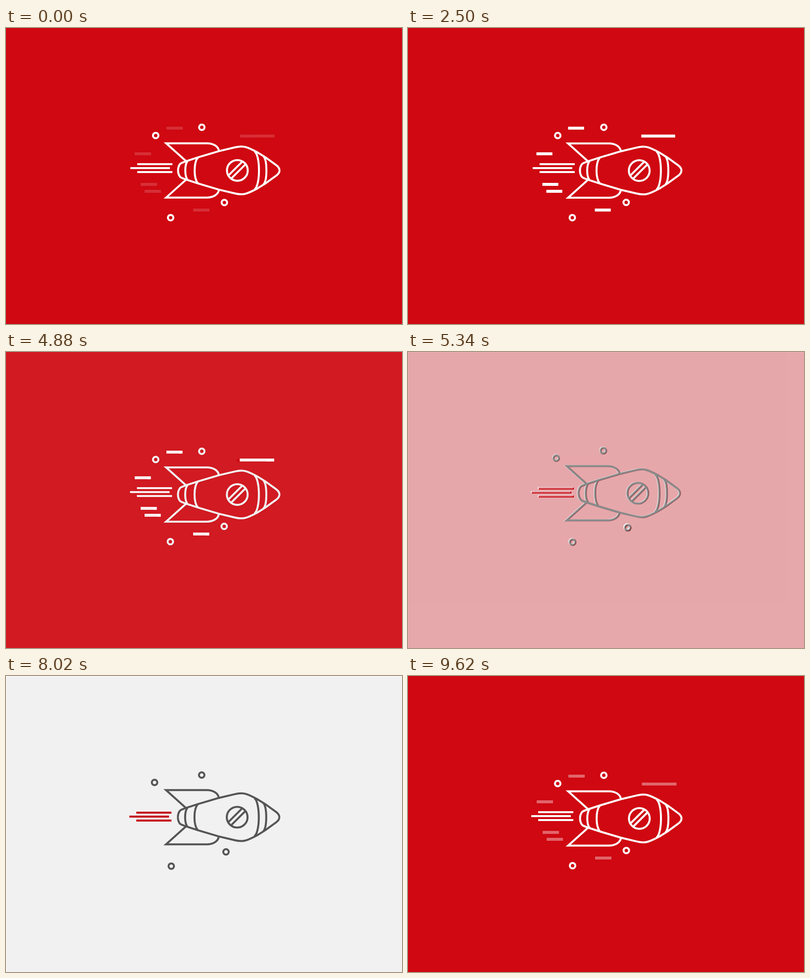
An HTML page for the animation above (9640 ms loop, 800 px wide and 600 px high).

```html
<!DOCTYPE html>
<html lang="en">
<head>
<meta charset="utf-8">
<title>Rocket</title>
<style>
  html, body { margin: 0; width: 100%; height: 100%; overflow: hidden; background: #fff; }
  svg { display: block; width: 100vw; height: 100vh; }
</style>
</head>
<body>
<svg id="stage" viewBox="0 0 800 600"></svg>
<script>
const LOOP = 9640, CYCLE = 1200, FLICKER = 120, FADE = 760;
const stage = document.getElementById('stage');

function add(parent, tag, attrs = {}) {
  const node = document.createElementNS('http://www.w3.org/2000/svg', tag);
  for (const key in attrs) node.setAttribute(key, attrs[key]);
  parent.appendChild(node);
  return node;
}

const clamp = v => Math.max(0, Math.min(1, v));
const swing = (time, peak, period) => Math.cos(2 * Math.PI * (time - peak) / period);
// A swing that lingers at both ends.
const drift = (time, peak) => Math.tanh(1.5 * swing(time, peak, CYCLE)) / Math.tanh(1.5);

const DOTS = [
  { x: 300.5, y: 216.1, dx: 2, dy: 1.9, peak: 100 },
  { x: 394.7, y: 200.2, dx: .9, dy: 1.1, peak: 50 },
  { x: 442.1, y: 354.5, dx: 1.4, dy: 1.1, peak: 810 },
  { x: 332.1, y: 384.4, dx: .8, dy: 0, peak: 980 }
];

// Each streak: left edge, middle height, full length.
const FIRST_STREAKS = [[324, 203, 33], [472.5, 219, 70], [260, 255, 33], [272, 317, 33], [280, 331, 33], [378, 369, 33]];
const LAST_STREAKS = [[345, 219, 70], [256, 255, 33], [264, 331, 33], [273.5, 361, 33], [328.5, 385, 70]];

function drawRocket(parent) {
  const half = [
    'M347.5 288.5C347.5 283 349.5 278 352 275Q353.5 273.5 365 269.5L388 262L430 249.5L462 241.9' +
    'Q476 238.5 485 241.5Q493 244 508 252L524 262L546 278Q552.5 283 552.5 288.5',
    'M364 270L323.5 233.5H406C419 233.5 429 240 430 249'
  ];
  for (const flip of ['', 'matrix(1 0 0 -1 0 577)']) {
    half.forEach(d => add(parent, 'path', { d, transform: flip }));
  }
  add(parent, 'path', {
    d: 'M367 269C360.5 277 360.5 300 367 308M388 262C378.7 272 378.7 305 388 315' +
       'M502 250C514 258 514 319 502 327M520 260C528 268 528 309 520 317' +
       'M449 299L477.5 270.5M455 305L484 276'
  });
  add(parent, 'circle', { cx: 467.3, cy: 288.5, r: 21 });
}

function makeScene(background, line, accent, offset) {
  const root = add(stage, 'g', { transform: `translate(${offset} ${offset})` });
  add(root, 'rect', { width: 800, height: 600, fill: background });
  const strokes = add(root, 'g', { fill: 'none', stroke: line, 'stroke-width': 4, 'stroke-miterlimit': 10 });
  const rocket = add(strokes, 'g');
  drawRocket(rocket);
  const dots = DOTS.map(() => add(strokes, 'circle', { r: 5.5 }));
  const flames = add(root, 'path', { d: 'M265 276h71M251 284h80M265 292h71', stroke: accent, 'stroke-width': 4 });

  const makeStreaks = list => {
    const group = add(root, 'g', { fill: accent });
    const bars = list.map(([, y]) => add(group, 'rect', { y: y - 3, height: 6 }));
    return (shrink, shift, opacity) => {
      group.setAttribute('opacity', clamp(opacity));
      list.forEach(([x, , length], i) => {
        bars[i].setAttribute('x', x + shift * length);
        bars[i].setAttribute('width', length * (1 - .57 * shrink));
      });
    };
  };
  const first = makeStreaks(FIRST_STREAKS), last = makeStreaks(LAST_STREAKS);

  function update(time) {
    const p = ((time % CYCLE) + CYCLE) % CYCLE;
    const x = 2.1 * drift(p, -40) - 2, y = 2 * drift(p, 170) - 1.5;
    rocket.setAttribute('transform', `translate(${x} ${y})`);
    DOTS.forEach((dot, i) => {
      const d = drift(p, dot.peak);
      dots[i].setAttribute('cx', dot.x + dot.dx * d);
      dots[i].setAttribute('cy', dot.y + dot.dy * d);
    });
    flames.setAttribute('transform', `translate(${2.2 * swing(p, 105, FLICKER) - 1.3} 0)`);

    const leave = clamp((p - 60) / 200) ** 2;
    first(leave, -.4 * leave, Math.min((p + 13) / 90, (260 - p) / 60));
    const finish = clamp((p - 240) / 140);
    last(finish, .55 * (1 - finish), Math.min((p - 220) / 60, (420 - p) / 70));
  }
  return { root, update };
}

const grey = makeScene('#f1f1f1', '#555', '#c4040f', 1);
const red = makeScene('#cf0811', '#fff', '#fff', 0);

function draw(now) {
  const t = now % LOOP;
  const mix = Math.min(clamp((t - LOOP / 2) / FADE), clamp((9600 - t) / FADE));
  red.update(t);
  grey.update(t - 4720);
  red.root.setAttribute('opacity', 1 - mix);
}

const start = performance.now();
function tick() {
  draw(performance.now() - start);
  requestAnimationFrame(tick);
}
tick();
</script>
</body>
</html>
```
